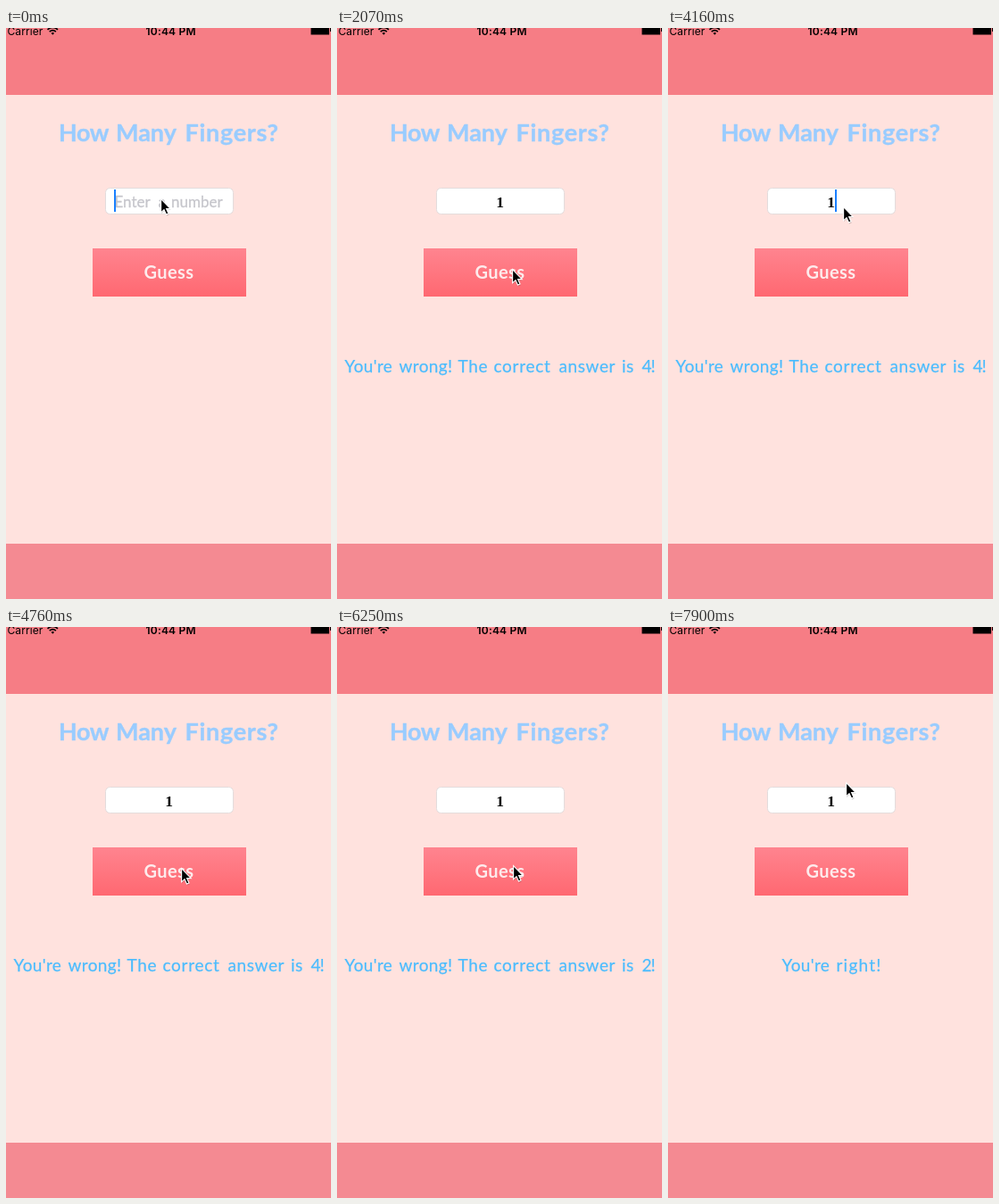
Write an HTML page that moves like this. It is 364 px wide and 640 px high and loops after 8000 ms.

```html
<!DOCTYPE html>
<html lang="en">
<head>
<meta charset="utf-8">
<title>How Many Fingers?</title>
<style>
html, body { margin: 0; width: 100%; height: 100%; overflow: hidden; background: #ffe2de; }
svg { display: block; width: 364px; height: 640px; }
text { white-space: pre; }
.chalk { font-family: Lato, sans-serif; stroke-linejoin: round; }
.status { font: 12px Inter, sans-serif; }
.title { font-size: 27px; font-weight: 700; fill: #99ccff; stroke: #99ccff; stroke-width: .4; }
.hint { font-size: 17px; fill: #c5c5cb; stroke: #c5c5cb; stroke-width: .3; }
.entry { font: 700 17.5px "Liberation Serif", serif; text-anchor: middle; }
.guess { font: 700 20px Lato, sans-serif; letter-spacing: .4px; fill: #fdebec; }
.result { font-size: 19px; letter-spacing: .35px; fill: #4cbcfd; stroke: #4cbcfd; stroke-width: .25; }

/* Everything changes in hard steps over one 8 s loop. */
.hint, .entry, .caret, .press, .wrong, .four, .two, .right, .pointer {
  animation: 8s step-end infinite;
}
.entry, .press, .wrong, .two, .right { opacity: 0; }
.hint { animation-name: hint; }
.entry { animation-name: entry; }
.caret { animation-name: caret; }
.press { animation-name: press; }
.wrong { animation-name: wrong; }
.four { animation-name: four; }
.two { animation-name: two; }
.right { animation-name: right; }
.pointer { animation-name: pointer; }

@keyframes hint { 0% { opacity: 1; } 1.875%, 100% { opacity: 0; } }
@keyframes entry { 0% { opacity: 0; } 1.875%, 100% { opacity: 1; } }
@keyframes caret {
  0% { opacity: 1; transform: none; }
  1.875% { opacity: 1; transform: translateX(66px); }
  7.5% { opacity: 0; transform: translateX(66px); }
  50.125% { opacity: 1; transform: translateX(66px); }
  55.75%, 100% { opacity: 0; transform: translateX(66px); }
}
@keyframes press {
  0%, 12.875%, 63.25%, 83.75%, 100% { opacity: 0; }
  11%, 61.375%, 80% { opacity: .22; }
}
@keyframes wrong { 0%, 83.75%, 100% { opacity: 0; } 12.875% { opacity: 1; } }
@keyframes four { 0% { opacity: 1; } 63.25%, 100% { opacity: 0; } }
@keyframes two { 0% { opacity: 0; } 63.25%, 100% { opacity: 1; } }
@keyframes right { 0% { opacity: 0; } 83.75%, 100% { opacity: 1; } }
@keyframes pointer {
  0% { transform: translate(173px, 191px); }
  3.75% { transform: translate(177px, 200px); }
  5.625% { transform: translate(183px, 221px); }
  7.5% { transform: translate(190px, 249px); }
  9.375% { transform: translate(195px, 271px); }
  11% { transform: translate(195px, 277px); }
  25.875% { transform: translate(196px, 270px); }
  27.75% { transform: translate(196px, 261px); }
  29.625% { transform: translate(196px, 243px); }
  31.5% { transform: translate(196px, 223px); }
  33.25% { transform: translate(196px, 208px); }
  35.125% { transform: translate(196px, 200px); }
  53.875% { transform: translate(196px, 208px); }
  55.75% { transform: translate(196px, 229px); }
  57.625% { transform: translate(196px, 255px); }
  59.5% { transform: translate(196px, 270px); }
  78.125% { transform: translate(197px, 267px); }
  96.875% { transform: translate(198px, 229px); }
  98.75%, 100% { transform: translate(199px, 174px); }
}
</style>
</head>
<body>
<svg viewBox="0 0 364 640">
  <defs>
    <linearGradient id="pink" x2="0" y2="1">
      <stop stop-color="#ff848f"/>
      <stop offset="1" stop-color="#ff6871"/>
    </linearGradient>
  </defs>
  <rect width="364" height="640" fill="#ffe2de"/>
  <rect width="364" height="75" fill="#f67d85"/>
  <rect y="578" width="364" height="62" fill="#f48a92"/>

  <g class="status">
    <text x="1.5" y="7.5" letter-spacing=".1">Carrier</text>
    <text x="156.5" y="7.5" font-weight="600" letter-spacing=".2">10:44 PM</text>
    <g fill="none" stroke="#000" stroke-width="1.6">
      <path d="M46.5 1.8Q52.3-2.8 58 1.8M48.7 4.1Q52.3 1 55.9 4.1"/>
      <path d="M50.5 5.8Q52.3 4.2 54.1 5.8L52.3 7.7Z" fill="#000" stroke="none"/>
    </g>
    <path d="M341.5-1H362V7.5H341.5ZM363 0H364V4H363Z"/>
  </g>

  <text class="chalk title" y="127"><tspan x="59" letter-spacing="-.5">How </tspan><tspan x="123">Many </tspan><tspan x="200.5" letter-spacing=".7">Fingers?</tspan></text>

  <rect x="111.5" y="179.5" width="143" height="29" rx="5" fill="#fff" stroke="#e3dcdc"/>
  <text class="chalk hint" y="200.5"><tspan x="121.5">Enter </tspan><tspan x="170.5">a </tspan><tspan x="185">number</tspan></text>
  <text class="entry" x="182.5" y="201">1</text>
  <rect class="caret" x="121" y="181" width="2" height="25" fill="#1a80ff"/>

  <rect x="97" y="247" width="172" height="54" fill="url(#pink)"/>
  <text class="guess" x="154.5" y="281">Guess</text>
  <rect class="press" x="97" y="247" width="172" height="54"/>

  <g class="chalk result">
    <g class="wrong">
      <text y="386"><tspan x="8.5">You're </tspan><tspan x="69.5">wrong! </tspan><tspan x="135.5" letter-spacing=".7">The </tspan><tspan x="175.5" letter-spacing=".7">correct </tspan><tspan x="248.5" letter-spacing=".6">answer </tspan><tspan x="319">is</tspan></text>
      <text class="four" x="341.5" y="386">4</text>
      <text class="two" x="341.5" y="386">2</text>
      <text x="351.5" y="386">!</text>
    </g>
    <text class="right" y="386"><tspan x="127.5">You're </tspan><tspan x="188.5" letter-spacing="1.2">right!</tspan></text>
  </g>

  <g class="pointer">
    <path d="M1 2V17L4.4 13.8 7 19.5 9.8 18.2 7.3 12.8H11.8Z" opacity=".2"/>
    <path d="M.6.6V15.8L4 12.6 6.5 18 9 16.9 6.6 11.6H11.2Z" stroke="#fff" stroke-width="1.1"/>
  </g>
</svg>
</body>
</html>
```
